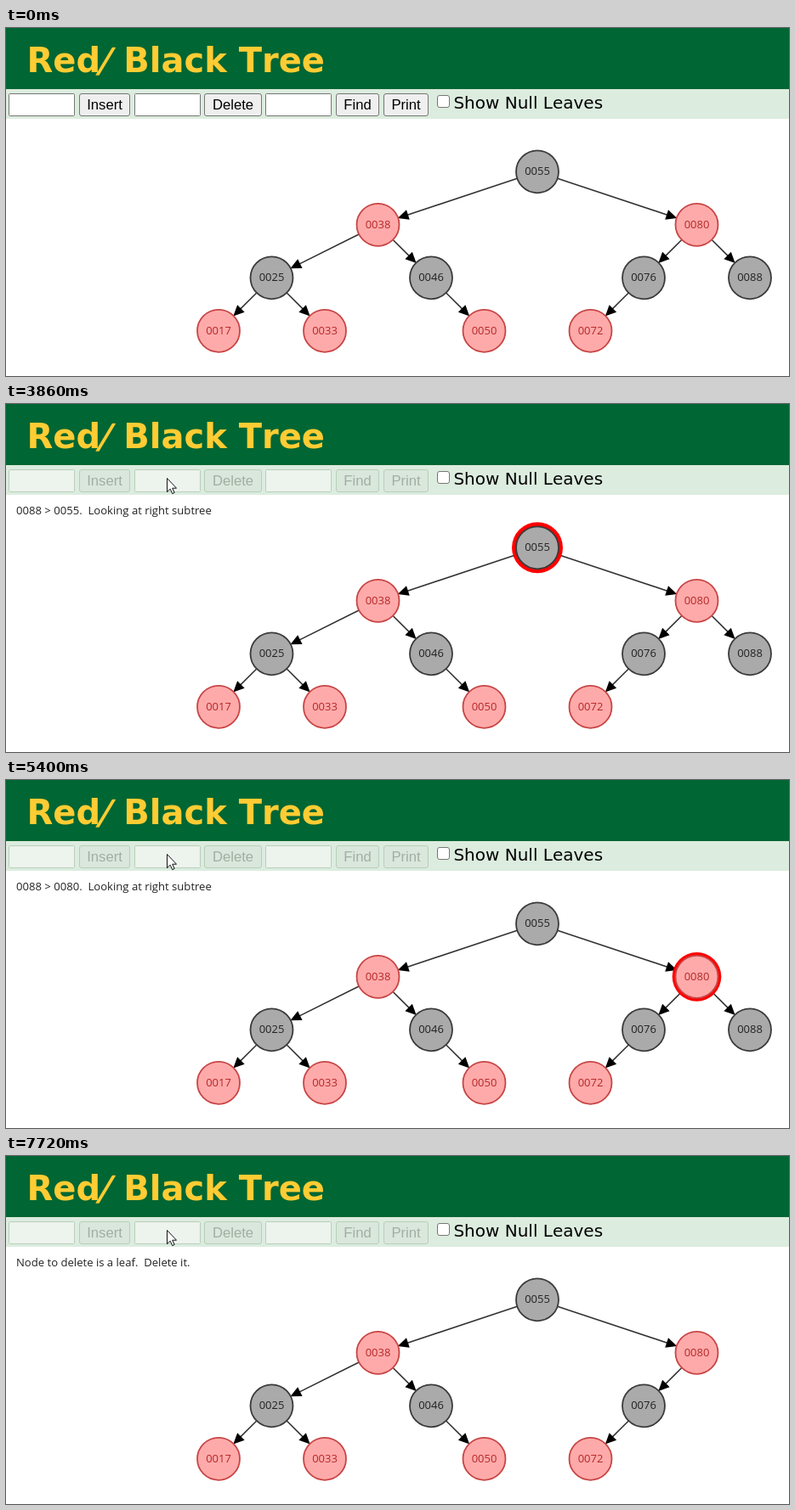
Write an HTML page that moves like this. It is 921x410 px and loops after 8 s.

```html
<!DOCTYPE html>
<html lang="en">
<head>
<meta charset="utf-8">
<title>Red/Black Tree</title>
<style>
  html, body { margin: 0; width: 100%; height: 100%; overflow: hidden; background: #fff; }
  svg { display: block; width: 921px; height: 410px; font-kerning: none; }
  .title { font: bold 40px "DejaVu Sans", Verdana, sans-serif; font-kerning: none; fill: #fc3; }
  .label { font: 20px "DejaVu Sans", Verdana, sans-serif; font-kerning: none; }
  .ui { font: 16.67px "Liberation Sans", Arial, sans-serif; }
  .note { font: 13.1px "Open Sans", "Noto Sans", sans-serif; fill: #222; white-space: pre; }
  .node text { font: 13px "Open Sans", "Noto Sans", sans-serif; text-anchor: middle; }
  .button text { text-anchor: middle; }
  .button rect { fill: #efefef; stroke: #767676; }
  .input { fill: #fff; stroke: #767676; }
  .off .input { fill: #edf3ed; stroke: #b8cfba; }
  .off .button rect { fill: #dae7dc; stroke: #b8cfba; }
  .off .button text { fill: #9fb0a2; }
</style>
</head>
<body>
<svg id="stage" viewBox="0 0 921 410">
  <rect width="921" height="410" fill="#fff"/>
  <rect width="921" height="72" fill="#063"/>
  <rect y="72" width="921" height="35" fill="#dcecdf"/>
  <g class="title">
    <text x="24.5" y="52">Red</text>
    <text transform="translate(124.5 52) skewX(-16)" x="-11" text-anchor="middle">/</text>
    <text x="138.3" y="52">Black Tree</text>
  </g>
  <g id="controls" class="ui"></g>
  <rect x="507.5" y="79.5" width="14" height="14" rx="2.5" fill="#fff" stroke="#767676"/>
  <text class="label" x="526.4" y="95">Show Null Leaves</text>
  <rect id="focus" x="151" y="77" width="78" height="27" rx="2" fill="none" stroke="#101010" stroke-width="2"/>
  <text id="typed" class="ui" x="155.3" y="95.5"></text>
  <rect id="caret" y="81" width="1" height="19"/>
  <text id="note" class="note" x="12" y="129.5"></text>
  <g id="edges"></g>
  <circle id="ring" fill="red"/>
  <g id="nodes"></g>
  <circle id="finder" r="25" fill="none" stroke="#070" stroke-width="5"/>
  <path id="arrow" d="M.5.5V16.6L4.2 13.2 6.7 18.6 9.1 17.5 6.7 12.2H11.5Z" fill="#fff" stroke="#111"/>
  <path id="beam" d="M-3.5-7.5H-1Q0-7.5 0-6.5Q0-7.5 1-7.5H3.5M0-6.5V6.5M-3.5 7.5H-1Q0 7.5 0 6.5Q0 7.5 1 7.5H3.5" fill="none" stroke="#111"/>
</svg>
<script>
const LOOP = 8000;
const FOCUS = 700, SUBMIT = 2010, MOVE = 840;
const T = { start: 2090, root: 3020, move1: 3967, right: 4910, move2: 5857, found: 6800, remove: 7720 };
const PULSE = 1360, PULSE_MIN = 5390;

const $ = id => document.getElementById(id);
const clamp = v => Math.max(0, Math.min(1, v));
const mix = (a, b, k) => a + (b - a) * k;

function add(parent, tag, attrs, text) {
  const el = document.createElementNS("http://www.w3.org/2000/svg", tag);
  for (const key in attrs) el.setAttribute(key, attrs[key]);
  if (text) el.textContent = text;
  return parent.appendChild(el);
}
const set = (el, attrs) => { for (const key in attrs) el.setAttribute(key, attrs[key]); };
const show = (el, on) => el.setAttribute("visibility", on ? "visible" : "hidden");

// Toolbar
const controls = $("controls");
for (const x of [3, 151, 305])
  add(controls, "rect", { class: "input", x: x + .5, y: 77.5, width: 77, height: 26, rx: 1 });
for (const [name, x, w] of [["Insert", 86, 60], ["Delete", 233, 68], ["Find", 388, 51], ["Print", 444, 53]]) {
  const g = add(controls, "g", { class: "button" });
  add(g, "rect", { x: x + .5, y: 77.5, width: w - 1, height: 26, rx: 2.5 });
  add(g, "text", { x: x + w / 2, y: 95.5 }, name);
}

// Tree: key -> column, level, red, parent
const tree = {
  55: [6, 0, 0], 38: [3, 1, 1, 55], 80: [9, 1, 1, 55],
  25: [1, 2, 0, 38], 46: [4, 2, 0, 38], 76: [8, 2, 0, 80], 88: [10, 2, 0, 80],
  17: [0, 3, 1, 25], 33: [2, 3, 1, 25], 50: [5, 3, 1, 46], 72: [7, 3, 1, 76]
};
const at = key => ({ x: 250 + 62.5 * tree[key][0], y: 169.3 + 62.5 * tree[key][1] });
const leaf = [];

for (const key in tree) {
  const [, , red, parent] = tree[key];
  const p = at(key);
  const g = add($("nodes"), "g", { class: "node" });
  add(g, "circle", {
    cx: p.x, cy: p.y, r: 25, "stroke-width": 1.8,
    fill: red ? "#faa" : "#aaa", stroke: red ? "#c84545" : "#3a3a3a"
  });
  add(g, "text", { x: p.x, y: p.y + 3.7, fill: red ? "#b42828" : "#222" }, "00" + key);
  if (key === "88") leaf.push(g);
  if (!parent) continue;

  const q = at(parent);
  const len = Math.hypot(p.x - q.x, p.y - q.y);
  const angle = Math.atan2(p.y - q.y, p.x - q.x) * 180 / Math.PI;
  const e = add($("edges"), "g", { transform: `translate(${q.x} ${q.y}) rotate(${angle})` });
  const tip = len - 24.5;
  add(e, "path", { d: `M25 0H${tip - 5}`, stroke: "#333", "stroke-width": 1.6 });
  add(e, "path", { d: `M${tip} 0l-12.8 -6v12Z` });
  if (key === "88") leaf.push(e);
}

const notes = [
  [T.start, "Deleting 0088"],
  [T.root, "0088 > 0055.  Looking at right subtree"],
  [T.right, "0088 > 0080.  Looking at right subtree"],
  [T.found, "0088 == 0088.  Found node to delete"],
  [T.remove, "Node to delete is a leaf.  Delete it."]
];

function pointer(t) {
  if (t >= 930) return { x: 189, y: t < SUBMIT ? 88 : 87 };
  const k = 1 - (1 - clamp((t - 70) / 700)) ** 1.6;
  const curve = (a, b, c) => mix(mix(a, b, k), mix(b, c, k), k);
  return { x: curve(690, 330, 184), y: curve(283, -8, 94) };
}

function drawPointer(t) {
  const p = pointer(t);
  const inField = t < SUBMIT && p.x > 151 && p.x < 229 && p.y > 77;
  const move = { transform: `translate(${p.x} ${p.y})` };
  set($("arrow"), move);
  set($("beam"), move);
  show($("arrow"), t >= 70 && !inField);
  show($("beam"), inField);
}

function drawField(t) {
  const active = t >= FOCUS && t < SUBMIT;
  const count = !active || t < 1400 ? 0 : t < 1550 ? 1 : 2;
  controls.classList.toggle("off", t >= SUBMIT);
  show($("focus"), active);
  $("typed").textContent = "8".repeat(count);
  set($("caret"), { x: 155 + Math.round(9.27 * count) });
  show($("caret"), active && (t < 1230 || t >= 1400));
}

function drawSearch(t) {
  const note = notes.filter(n => t >= n[0]).pop();
  $("note").textContent = note ? note[1] : "";

  const lit = t >= T.root && t < T.move1 ? 55
    : t >= T.right && t < T.move2 ? 80
    : t >= T.found && t < T.remove ? 88 : 0;
  show($("ring"), lit);
  if (lit) {
    const phase = (((t - PULSE_MIN) / PULSE) % 1 + 1) % 1;
    const p = at(lit);
    set($("ring"), { cx: p.x, cy: p.y, r: 28.75 + 5 * (1 - Math.abs(2 * phase - 1)) });
  }

  const first = t >= T.move1 && t < T.right;
  const second = t >= T.move2 && t < T.found;
  show($("finder"), first || second);
  if (first || second) {
    const a = at(first ? 55 : 80), b = at(first ? 80 : 88);
    const k = clamp((t - (first ? T.move1 : T.move2)) / MOVE);
    set($("finder"), { cx: mix(a.x, b.x, k), cy: mix(a.y, b.y, k) });
  }
  leaf.forEach(el => show(el, t < T.remove));
}

function draw(t) {
  drawPointer(t);
  drawField(t);
  drawSearch(t);
}

const begin = performance.now();
function tick() {
  draw((performance.now() - begin) % LOOP);
  requestAnimationFrame(tick);
}
draw(0);
requestAnimationFrame(tick);
</script>
</body>
</html>
```
